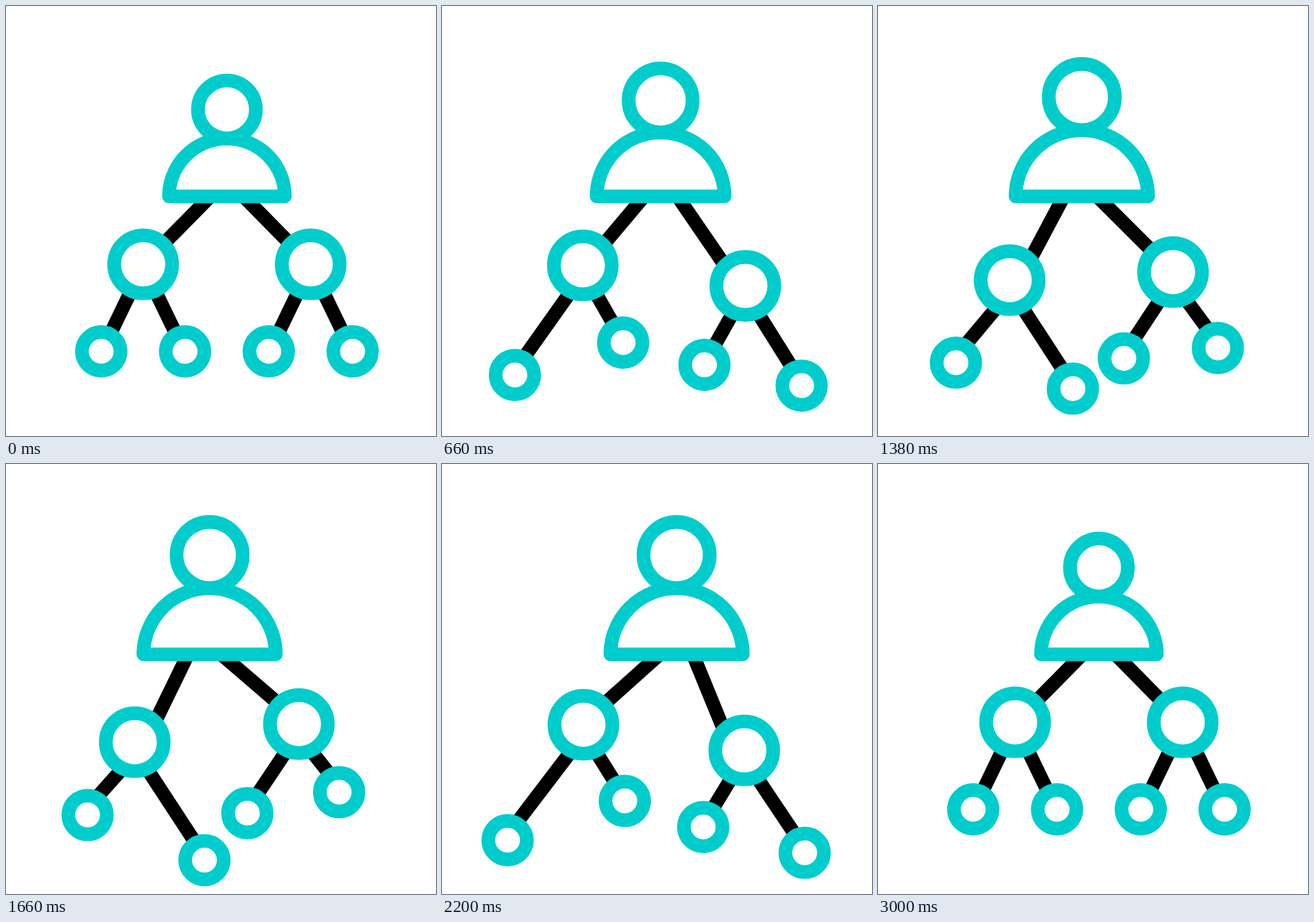
An HTML page without scripts that plays this animation: 640 px wide and 640 px high, repeating every 3220 ms.

```html
<!DOCTYPE html>
<html lang="en">
<head>
<meta charset="utf-8">
<title>Team tree</title>
<style>
  /* Pose weights (right, left) and the x of the body and of the arm roots */
  @property --right { syntax: "<number>"; inherits: true; initial-value: 0; }
  @property --left { syntax: "<number>"; inherits: true; initial-value: 0; }
  @property --body { syntax: "<number>"; inherits: true; initial-value: 328.8; }
  @property --hip { syntax: "<number>"; inherits: true; initial-value: 328.8; }

  html, body { margin: 0; width: 100%; height: 100%; overflow: hidden; background: #fff; }

  svg {
    display: block; width: 100vw; height: 100vh;
    animation: 3220ms cubic-bezier(.3333, 0, .6667, 1) infinite;
    animation-name: sway, drift;
  }
  /* Stops at 200, 900, 1600, 2300 and 3000 ms */
  @keyframes sway {
    0%, 6.211%, 93.168%, 100% { --right: 0; --left: 0; --hip: 328.8; }
    27.95% { --right: 1; --left: 0; --hip: 324.5; }
    49.689% { --right: 0; --left: 1; --hip: 294.5; }
    71.429% { --right: 1; --left: 0; --hip: 351.7; }
  }
  /* The body turns back a little before the rest */
  @keyframes drift {
    0%, 6.211%, 93.168%, 100% { --body: 328.8; }
    27.95% { --body: 324.1; }
    47.826% { --body: 299.5; }
    71.429% { --body: 351.6; }
  }

  .ring, .person { stroke: #00cccc; stroke-width: 20.4; stroke-linejoin: round; }
  .ring { fill: #fff; }
  .person { fill: none; }
  .person *, .link { vector-effect: non-scaling-stroke; }

  .person {
    transform: translate(calc(var(--body) * 1px), 283.4px)
      scale(calc(1 + .143 * (var(--right) + var(--left))));
  }

  /* --side is -1 or 1; r and l are the offsets of a node in the two poses */
  .branch, .leaf {
    --dx: calc(var(--right) * var(--rx) + var(--left) * var(--lx));
    --dy: calc(var(--right) * var(--ry) + var(--left) * var(--ly));
  }
  .branch {
    --rest: calc(328.8 + var(--side) * 124.7);
    --nx: calc(var(--rest) + var(--dx));
    --ny: calc(384.5 + var(--dy));
  }
  .leaf {
    --cx: calc(var(--rest) + var(--side) * 62.4 + var(--dx));
    --cy: calc(514 + var(--dy));
  }
  .branch > .ring { transform: translate(calc(var(--nx) * 1px), calc(var(--ny) * 1px)); }
  .leaf > .ring { transform: translate(calc(var(--cx) * 1px), calc(var(--cy) * 1px)); }

  /* A unit segment laid from (x1, y1) to (x2, y2) */
  .link {
    --w: calc(var(--x2) - var(--x1));
    --h: calc(var(--y2) - var(--y1));
    fill: none; stroke: #000; stroke-width: 20.5;
    transform: matrix(var(--w), var(--h), calc(-1 * var(--h)), var(--w), var(--x1), var(--y1));
  }
  .branch > .link {
    --x1: calc(var(--hip) + var(--side) * 24.9);
    --y1: 283.5;
    --x2: calc(var(--nx) - var(--side) * 30.5);
    --y2: calc(var(--ny) - 30.5);
  }
  .leaf > .link {
    --x1: calc(var(--nx) + var(--side) * 17.6);
    --y1: calc(var(--ny) + 38.7);
    --x2: calc(var(--cx) - var(--side) * 13.5);
    --y2: calc(var(--cy) - 25.9);
  }
</style>
</head>
<body>
<svg viewBox="0 0 640 640">
  <g class="branch" style="--side:-1; --rx:7.5; --ry:2; --lx:-12.9; --ly:30.1">
    <path class="link" d="M0 0H1"/>
    <g class="leaf" style="--side:-1; --rx:-45.5; --ry:48.2; --lx:-19.7; --ly:7.5">
      <path class="link" d="M0 0H1"/>
      <circle class="ring" r="28.7"/>
    </g>
    <g class="leaf" style="--side:1; --rx:4.2; --ry:-17.8; --lx:29.4; --ly:77.6">
      <path class="link" d="M0 0H1"/>
      <circle class="ring" r="28.7"/>
    </g>
    <circle class="ring" r="43.1"/>
  </g>

  <g class="branch" style="--side:1; --rx:-2.8; --ry:44; --lx:-17.9; --ly:1.7">
    <path class="link" d="M0 0H1"/>
    <g class="leaf" style="--side:-1; --rx:-.6; --ry:27.5; --lx:-32.6; --ly:5.2">
      <path class="link" d="M0 0H1"/>
      <circle class="ring" r="28.7"/>
    </g>
    <g class="leaf" style="--side:1; --rx:26.5; --ry:70; --lx:-21.1; --ly:-27.7">
      <path class="link" d="M0 0H1"/>
      <circle class="ring" r="28.7"/>
    </g>
    <circle class="ring" r="43.1"/>
  </g>

  <g class="person">
    <circle cy="-129.4" r="43.1"/>
    <path d="M-86.2 0A86.2 86.2 0 0 1 86.2 0Z"/>
  </g>
</svg>
</body>
</html>
```
